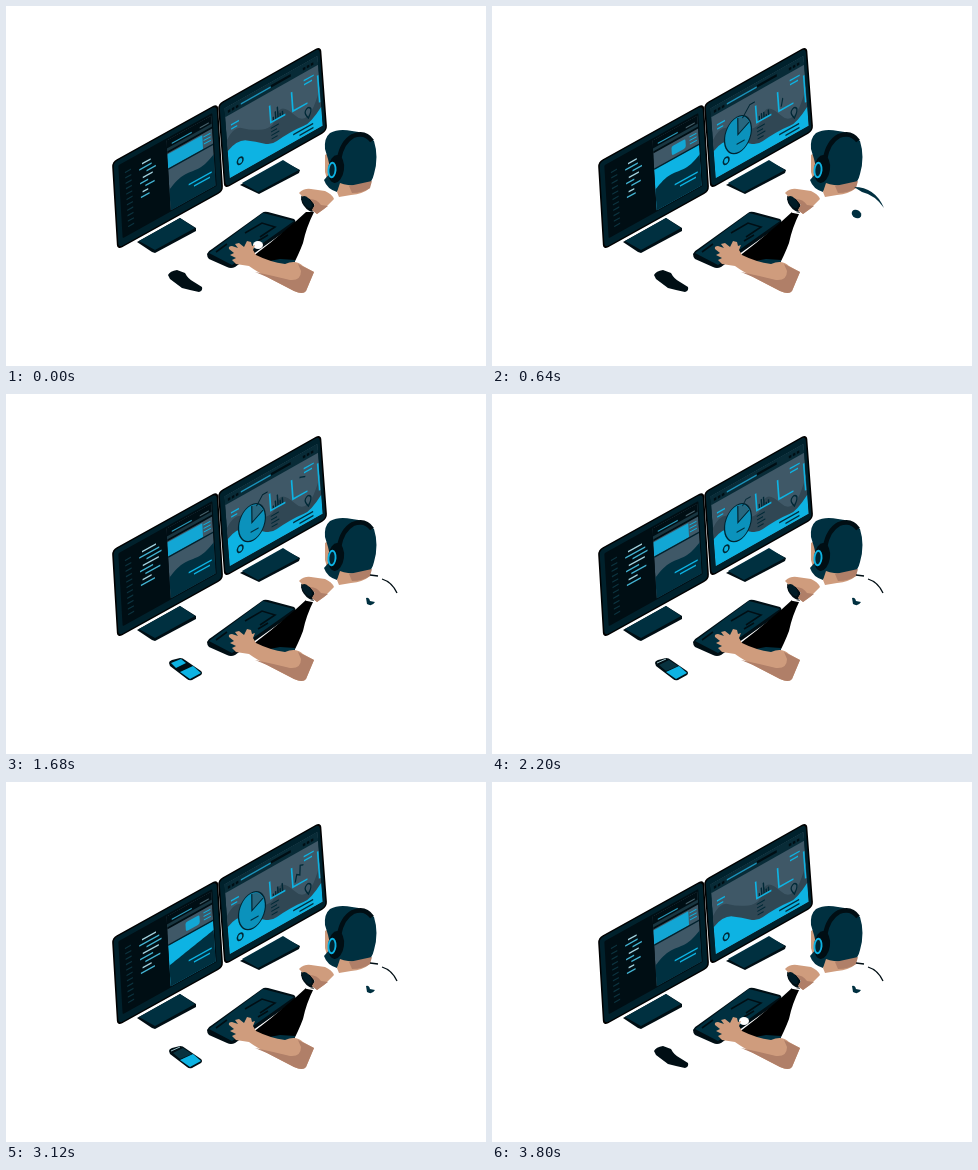
Recreate the animation shown at these times as an HTML page with a canvas. Size 480x360 px, loop 3.84 s.

```html
<!DOCTYPE html>
<html lang="en">
<head>
<meta charset="utf-8">
<title>Developer at work</title>
<style>
html, body { margin: 0; width: 100%; height: 100%; overflow: hidden; background: #fff; }
canvas { display: block; }
</style>
</head>
<body>
<canvas id="stage" width="480" height="360"></canvas>
<script>
const ctx = document.getElementById('stage').getContext('2d');
const LOOP = 3840;
const NAVY = '#003040', BODY = '#00212c', INK = '#000e14', CYAN = '#0db3e3',
      STEEL = '#3f5867', SKIN = '#cf9c7d', SHADE = '#b07f68';

const clamp = v => Math.max(0, Math.min(1, v));
const ease = v => v * v * (3 - 2 * v);
const ramp = (t, from, to) => ease(clamp((t - from) / (to - from)));
const pulse = (t, a, b, c, d) => ramp(t, a, b) - ramp(t, c, d);
const mix = (a, b, k) => a + (b - a) * k;

function fill(d, color) {
  ctx.fillStyle = color;
  ctx.fill(new Path2D(d));
}
function stroke(d, color, width = 1) {
  ctx.strokeStyle = color;
  ctx.lineWidth = width;
  ctx.stroke(new Path2D(d));
}
function rect(x, y, w, h, color, r = 0) {
  ctx.fillStyle = color;
  ctx.beginPath();
  ctx.roundRect(x, y, w, h, r);
  ctx.fill();
}
function oval(x, y, rx, ry, color, turn = 0) {
  ctx.fillStyle = color;
  ctx.beginPath();
  ctx.ellipse(x, y, rx, ry, turn, 0, 7);
  ctx.fill();
}
function scoped(draw) {
  ctx.save();
  draw();
  ctx.restore();
}
function fade(alpha, draw) {
  if (alpha < .01) return;
  scoped(() => {
    ctx.globalAlpha = alpha;
    draw();
  });
}
// Runs draw() in the slanted plane of a screen.
function plane(x, y, slope, lean, draw) {
  scoped(() => {
    ctx.transform(1, slope, lean, 1, x, y);
    draw();
  });
}
function clipRect(x, y, w, h, draw) {
  scoped(() => {
    ctx.beginPath();
    ctx.rect(x, y, w, h);
    ctx.clip();
    draw();
  });
}
function monitor(w, h) {
  rect(-1, -1.5, w + 2, h + 3, '#000', 5);
  rect(.5, 0, w - 1, h, BODY, 4);
}

function codeScreen(t) {
  monitor(104, 85);
  rect(5, 5, 94, 73, INK, 1);
  for (let i = 0; i < 11; i++) rect(11, 15 + i * 5.4, 6, 1.3, '#0c3440');

  // Typed lines: [indent, length]
  const lines = [[3, 14], [0, 20], [7, 15], [3, 16], [0, 13], [5, 15], [2, 9], [0, 14]];
  const typed = mix(.62, 1, pulse(t, 600, 1050, 3200, 3750));
  lines.forEach(([x, len], i) =>
    rect(25 + x, 15.5 + i * 4.6, len * typed, 1.5, i % 3 ? '#43b3d2' : '#a2d3e0'));

  clipRect(53, 7, 45, 70, () => {
    const p = t % 1920;
    const open = pulse(p, 290, 600, 1250, 1620);
    const flat = pulse(p, 620, 1000, 1260, 1640);
    rect(53, 7, 45, 70, STEEL);
    // The card shrinks to a badge while the area below lights up.
    rect(mix(53, 71, open), mix(21, 23, open), mix(35, 14, open), mix(14, 9, open), '#12a6d4', 2 * open);
    for (let i = 0; i < 3; i++) rect(89, 23 + i * 3.5, 7, 1, CYAN);
    fade(open, () => rect(53, 36, 45, 41, CYAN));
    rect(53, 35, 45, 1.5, '#00222e');

    let hill = 'M53 80';
    for (let x = 0; x <= 46; x += 2) {
      const y = 56 - x * .24 - 3 * (1 - flat) * Math.sin(x / 46 * Math.PI * 2);
      hill += `L${53 + x} ${y}`;
    }
    fill(hill + 'L99 80Z', NAVY);
    rect(72, 61, 23, 1.5, CYAN);
    rect(77, 65, 16, 1.5, CYAN);

    rect(53, 7, 45, 13, INK);
    rect(53, 15, 45, 3, '#193641');
    rect(58, 12, 20, 1.3, '#2999b9');
    rect(86, 12, 9, 1.3, '#46616b');
  });
}

function pie(t) {
  const size = pulse(t, 120, 560, 3280, 3720);
  if (size < .01) return;
  scoped(() => {
    ctx.translate(29.5, 46.3);
    ctx.scale(size, size);
    oval(0, 0, 14, 18, '#002532');
    oval(0, 0, 12.8, 16.8, '#0b92bc');
    fill('M0 0L1-16Q9-15 11.5-6Z', '#28677f');
    stroke('M1-16L0 0L11.5-6', '#002532', 1.2);
    rect(-2, 8, 8, 1.2, NAVY);
  });
  const call = pulse(t, 400, 620, 1250, 2700);
  fade(clamp(call * 3), () =>
    stroke(`M35 33L${37 + 6 * call} ${30 - 6 * call}h5`, '#002532', 1.2));
}

function chartScreen(t) {
  monitor(101, 82);
  clipRect(5, 6, 93, 70, () => {
    rect(5, 6, 93, 70, STEEL);
    fill('M5 38Q13 28 21 35T40 47T55 41T72 51T98 38V76H5Z', '#304754');
    fill('M5 49Q15 43 24 49T40 61T53 66T66 65T80 66T98 57V76H5Z', CYAN);
    rect(5, 6, 93, 9, '#082b37');
    rect(21, 10, 30, 1.5, '#1b92ba');
    rect(51, 9, 20, 2.5, INK);
    for (let i = 0; i < 3; i++) {
      rect(8 + i * 4, 10, 2.5, 2.5, INK);
      rect(83 + i * 4, 10, 2.5, 2.5, INK);
    }
    rect(96, 25, 1.5, 27, CYAN);
    for (let i = 0; i < 2; i++) {
      rect(10, 25 + i * 4, 8 - i * 2, 1.4, CYAN);
      rect(83, 22 + i * 4, 10 - i * 2, 1.3, CYAN);
      rect(69 + i * 6, 68 + i * 4, 20 - i * 6, 1.5, NAVY);
    }
    for (let i = 0; i < 4; i++) rect(48, 50 + i * 3.5, 8 - i % 2 * 2, 1.2, '#002937');

    pie(t);

    for (let i = 0; i < 5; i++) {
      const h = (4 + i % 3 * 3) * (.8 + .3 * Math.sin(t / LOOP * Math.PI * 4 + i));
      rect(50.5 + i * 2.3, 44 - h, 1.4, h, '#002937');
    }
    stroke('M48.5 28V45H63M70.5 27V46H85', CYAN, 1.6);
    // The trend line is drawn, then erased from its start.
    const trend = (a, b, c, d) => {
      const head = ramp(t, a, b), tail = ramp(t, c, d);
      if (head <= tail) return;
      scoped(() => {
        ctx.setLineDash([26 * (head - tail), 99]);
        ctx.lineDashOffset = -26 * tail;
        stroke('M73 43L75 36L78 38L79 29L84 31', '#002937', 1.3);
      });
    };
    trend(400, 1080, 1250, 1900);
    trend(2600, 3250, 3100, 3600);

    stroke('M85 61Q81 55 82.5 52.5Q85 49 87.5 52.5Q89 55 85 61Z', '#002937', 1.3);
    stroke('M13.5 65a2.8 3.2 0 1 1 5.6 0a2.8 3.2 0 1 1-5.6 0', '#002937', 1.5);
  });
}

function phone(t) {
  const on = pulse(t, 1380, 1640, 3430, 3720);
  fade(1 - on, () =>
    fill('M162 269Q164 265 171 264L179 267Q182 273 188 276L196 281Q197 285 193 286L184 284L176 282L164 273Z', INK));
  fade(on, () => {
    ctx.translate(0, 12 * (1 - on));
    fill('M163 269Q163 267 166 266L174 264Q177 264 179 266L195 277Q197 279 195 281L186 286Q183 287 181 285L164 272Z', INK);
    fill('M174 278L187 272L195 279L184 285Z', CYAN);
    const shift = ramp(t, 1700, 2150);
    fade(on * (1 - shift), () => fill('M165 269L175 265L180 269L170 274Z', CYAN));
    fade(on * shift, () => {
      fill('M167 271L177 266L186 272L174 277Z', '#08323f');
      stroke('M165 269L174 265', '#9cc2ca', 1);
    });
  });
}

function desk() {
  fill('M201 248Q202 245 206 243L256 207Q258 205 262 206L288 213Q291 215 288 219L229 261Q225 263 221 261L203 253Q201 251 201 248Z', INK);
  fill('M203 247L257 207L288 215L226 259Z', NAVY);
  stroke('M210 246L221 238M239 227L256 217L269 221L254 231M252 235L262 229', INK, 1.6);
}

function person(t) {
  // Sleeve and forearm
  fill('M246 251L264 237L289 216L300 206L308 206Q300 222 297 237Q292 250 287 259L266 260Z', '#000');
  fill('M258 256L274 253L289 254L287 262L270 262Z', NAVY);
  if (t < 160 || t > 3600) oval(252, 239, 5, 4, '#fff');
  fill('M223 243Q222 240 226 240L232 242L229 238L233 237L238 241L241 235L245 236L246 240L249 239L247 244L250 249Q264 256 279 258Q290 253 297 260L308 266L300 285Q297 289 288 285L261 271Q250 265 243 260L230 258L226 254L230 252L224 249L228 247Z', SKIN);
  fill('M249 266Q268 270 284 274Q295 275 295 265L292 258L308 266L300 285Q297 289 288 285L261 271Z', SHADE);

  // Hand on the mouse
  oval(302, 197, 5, 10, INK, -.6);
  fill('M293 187Q298 182 305 183L319 185Q326 188 328 193L318 203L311 208L306 204L309 199L304 193L297 191Z', SKIN);
  fill('M309 199L304 193Q311 193 315 199L322 200L311 208L306 204Z', SHADE);
  oval(301, 196, 3.5, 7, '#001b26', -.6);
  if (t > 160) stroke('M300 206L310 208', '#fff', 1.5);

  // Face, hair, neck and headphones
  fill('M319 149L326 145L333 176L322 177L319 166Z', SKIN);
  fill('M319 143Q318 132 324 127Q333 122 346 125Q360 126 368 135Q373 151 368 168Q366 177 360 180L334 181L331 186Q321 183 318 174L325 166L322 153Z', NAVY);
  fill('M334 177Q345 181 363 179L364 182Q357 188 345 189L333 191L331 186Z', SKIN);
  fill('M343 180L366 175L364 182Q357 187 346 187Z', SHADE);
  stroke('M333 153Q336 136 347 130Q359 125 366 135', INK, 4.5);
  oval(330, 163, 8, 14, INK, .13);
  oval(326, 164, 4.5, 8.3, CYAN, .08);
  oval(326, 164, 2.6, 6.2, '#002431', .08);

  // Collar
  if (t < 120) return;
  if (t < 1240) {
    fill('M362 181Q383 181 392 202Q383 189 370 186Z', NAVY);
    oval(364.5, 208, 5, 4, NAVY, .5);
  } else {
    stroke('M364 181L372 182M376 185Q386 188 391 199', INK, 1.3);
    fill('M360 204Q363 203 364 207L369 208Q366 213 361 210Z', NAVY);
  }
}

function render(t) {
  ctx.fillStyle = '#fff';
  ctx.fillRect(0, 0, 480, 360);
  fill('M131 236L174 212L190 222L190 225L149 247L146 246Z', INK);
  fill('M133 235L174 212L189 222L149 244Z', NAVY);
  fill('M234 179L277 155L294 164L293 167L253 188Z', INK);
  fill('M236 177L277 154L293 164L252 186Z', NAVY);
  plane(107, 157, -.555, .06, () => codeScreen(t));
  plane(213, 99, -.565, .075, () => chartScreen(t));
  desk();
  phone(t);
  person(t);
}

function tick() {
  render(performance.now() % LOOP);
  requestAnimationFrame(tick);
}
tick();
</script>
</body>
</html>
```
